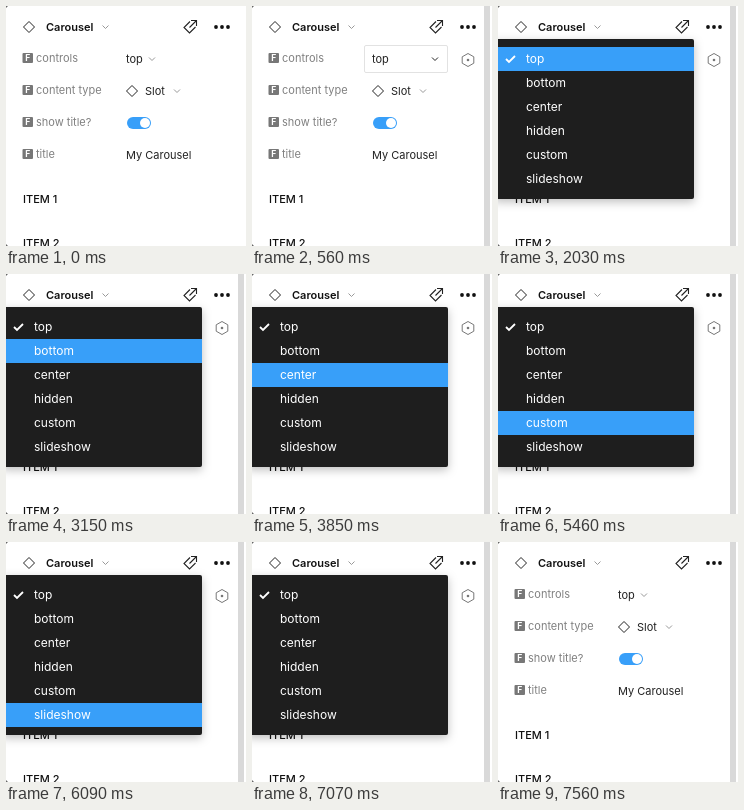
Write an HTML page that moves like this. It is 240 px wide and 240 px high and loops after 7630 ms.

```html
<!DOCTYPE html>
<html lang="en">
<head>
<meta charset="utf-8">
<title>Property menu</title>
<style>
html, body { margin: 0; width: 100%; height: 100%; overflow: hidden; background: #fff; }
svg { display: block; width: 100vw; height: 100vh; }
text { font: 11px Inter, sans-serif; fill: #222; white-space: pre; }
.title { font-weight: 600; fill: #111; }
.label { fill: #808080; }
.badge { font-size: 8.5px; font-weight: 700; fill: #fff; }
.head { font-weight: 500; fill: #111; }
#menu text { font-size: 12px; fill: #fff; }
#panel { filter: drop-shadow(0 3px 5px rgba(0, 0, 0, .25)); }
.line { fill: none; stroke: #222; }
.soft { fill: none; stroke: #999; }
.blue { fill: #389ff9; }
</style>
</head>
<body>
<svg viewBox="0 0 240 240">
  <path d="M0 0h2L0 2zM0 240v-2l2 2z" fill="#666"/>
  <rect id="strip" x="232" width="6" height="240" fill="#d9d9d9"/>

  <path class="line" d="M23 15.5l5.5 5.5-5.5 5.5-5.5-5.5z"/>
  <text class="title" x="40" y="25">Carousel</text>
  <path class="soft" d="M96.500 19.500l3 3 3-3"/>
  <path class="line" stroke-width="1.1" d="M184 15.500l-6 6 5.500 5.500 6-6M183.500 21.500l6.500-6.500M185 14.500h5.500v5.500"/>
  <g fill="#111">
    <circle cx="210" cy="21" r="1.9"/><circle cx="216" cy="21" r="1.9"/><circle cx="222" cy="21" r="1.9"/>
  </g>

  <g id="labels"></g>
  <g id="field">
    <rect x="112.500" y="39.500" width="83" height="27" rx="1.500" fill="#fff" stroke="#e2e2e2"/>
    <path class="line" d="M180 51.500l3 3 3-3"/>
  </g>
  <text x="120" y="57">top</text>
  <path id="chevron" class="soft" d="M143 51.500l3 3 3-3"/>
  <g id="hex">
    <path d="M216 47.500l5.800 3.300v6.400l-5.800 3.300-5.800-3.300v-6.400z" fill="none" stroke="#777"/>
    <circle cx="216" cy="54" r="1.300" fill="#777"/>
  </g>

  <path class="line" d="M126 79.500l5.500 5.500-5.500 5.500-5.500-5.500z"/>
  <text x="139" y="89">Slot</text>
  <path class="soft" d="M168 83.500l3 3 3-3"/>
  <rect class="blue" x="121" y="111" width="24" height="12" rx="6"/>
  <circle cx="139" cy="117" r="5" fill="#fff"/>
  <text x="120" y="153">My Carousel</text>
  <text class="head" x="17" y="197">ITEM 1</text>
  <text class="head" x="17" y="241">ITEM 2</text>

  <g id="menu">
    <rect id="panel" x="-4" y="33" width="200" height="160" rx="2" fill="#1e1e1e"/>
    <rect id="highlight" class="blue" width="196" height="24"/>
    <path d="M8 53l3 3 6-6" fill="none" stroke="#fff" stroke-width="1.800"/>
    <g id="options"></g>
  </g>
</svg>
<script>
const $ = id => document.getElementById(id);
const show = (id, on) => $(id).style.display = on ? '' : 'none';

$('labels').innerHTML = ['controls', 'content type', 'show title?', 'title'].map((name, i) => {
  const y = 47 + 32 * i;
  return `<rect x="16.500" y="${y}" width="10.500" height="10" rx="1" fill="#777"/>
    <text class="badge" x="19.300" y="${y + 8}">F</text>
    <text class="label" x="30" y="${y + 9}">${name}</text>`;
}).join('');

$('options').innerHTML = ['top', 'bottom', 'center', 'hidden', 'custom', 'slideshow']
  .map((name, i) => `<text x="28" y="${57 + 24 * i}">${name}</text>`).join('');

const LOOP = 7630, HOVER = 560, OPEN = 2030, LEAVE = 7070, CLOSE = 7560;
const steps = [OPEN, 3150, 3850, 4760, 5460, 6090];

function draw(now) {
  const t = now % LOOP;
  const active = t >= HOVER && t < CLOSE;
  show('strip', t >= HOVER);
  show('field', active);
  show('hex', active);
  show('chevron', !active);
  show('menu', t >= OPEN && t < CLOSE);
  show('highlight', t >= OPEN && t < LEAVE);
  const row = steps.filter(s => t >= s).length - 1;
  $('highlight').setAttribute('y', 41 + 24 * Math.max(row, 0));
}

let start;
function tick(now) {
  start ??= now;
  draw(now - start);
  requestAnimationFrame(tick);
}
draw(0);
requestAnimationFrame(tick);
</script>
</body>
</html>
```
